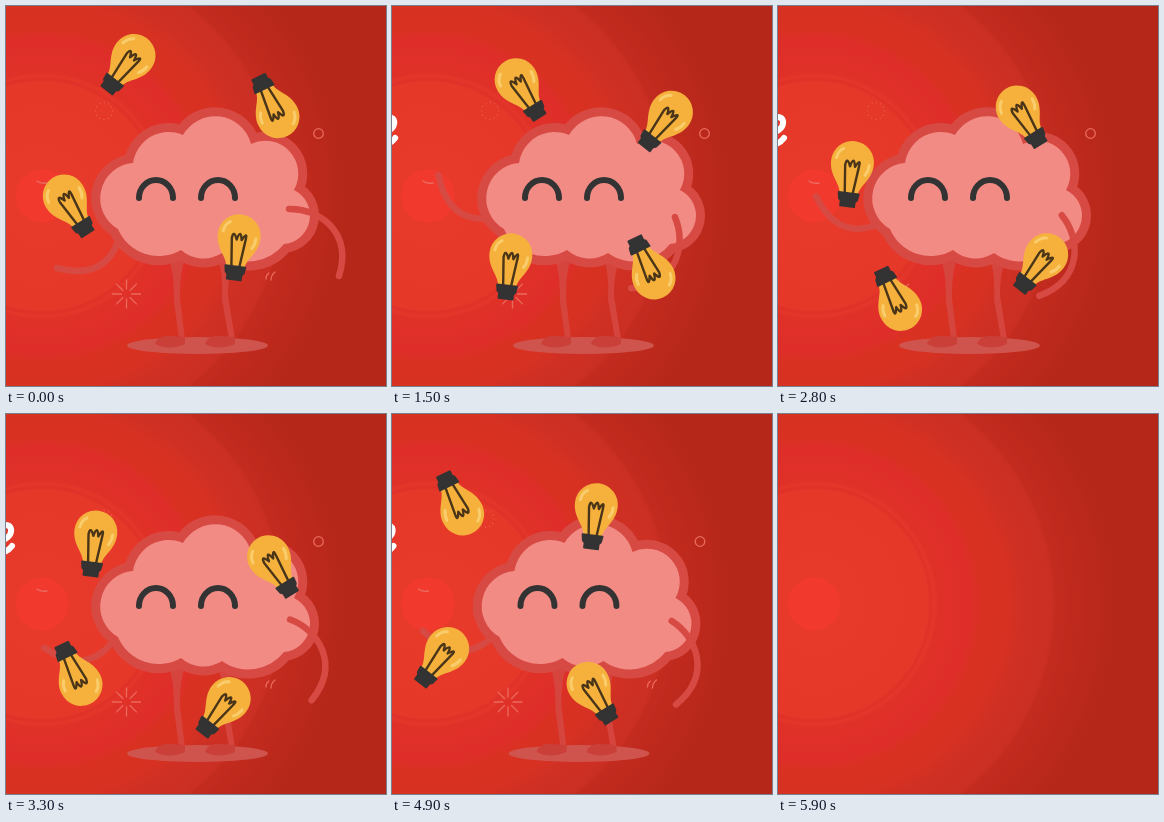
Recreate the animation shown at these times as an HTML page. Size 380x380 px, loop 6100 ms.

```html
<!DOCTYPE html>
<html lang="en">
<head>
<meta charset="utf-8">
<title>Juggling brain</title>
<style>
  html, body { margin: 0; width: 100%; height: 100%; overflow: hidden; background: #b52719; }
  svg { display: block; width: 100vw; height: 100vh; }
  .line { fill: none; stroke-linecap: round; stroke-linejoin: round; }
  .limb { stroke: #d74a43; stroke-width: 6.5; }
  .decor { stroke: #ea6a5e; stroke-width: 1.3; }
</style>
</head>
<body>
<svg viewBox="0 0 380 380">
  <defs>
    <radialGradient id="glow" gradientUnits="userSpaceOnUse" cx="36" cy="190" r="400">
      <stop offset=".065" stop-color="#f13a2d"/>
      <stop offset=".067" stop-color="#e83a2a"/>
      <stop offset=".285" stop-color="#e53829"/>
      <stop offset=".292" stop-color="#df3128"/>
      <stop offset=".3" stop-color="#e4372a"/>
      <stop offset=".31" stop-color="#e03128"/>
      <stop offset=".39" stop-color="#df2e2a"/>
      <stop offset=".42" stop-color="#d93122"/>
      <stop offset=".49" stop-color="#d63122"/>
      <stop offset=".52" stop-color="#cf3023"/>
      <stop offset=".595" stop-color="#cb2f23"/>
      <stop offset=".605" stop-color="#c32b1f"/>
      <stop offset=".73" stop-color="#b8281a"/>
      <stop offset=".76" stop-color="#b42719"/>
    </radialGradient>
    <g id="bulb">
      <path fill="#f5b13c" d="M-9 21C-9 10-21.500 4-21.500-12A21.500 21.500 0 0 1 21.500-12C21.500 4 9 10 9 21Z"/>
      <path class="line" stroke="#f9cc6c" stroke-width="3" d="M-16.500-15q1-7 6-10M17-11q0 6-3 10"/>
      <path class="line" stroke="#4a3518" stroke-width="2.400" d="M-4 19L-7-9Q-6-18-2-8Q1-20 3-8Q8-18 7-9L4 19"/>
      <path fill="#333" stroke="#333" stroke-width="2" stroke-linejoin="round" d="M-10 19H10L9 25L7 27V32H-7V27L-9 25Z"/>
    </g>
  </defs>

  <rect width="380" height="380" fill="url(#glow)"/>

  <g id="scene">
    <g class="line decor">
      <circle cx="312.500" cy="127.500" r="4.800"/>
      <circle cx="98" cy="105" r="8.500" stroke-dasharray=".1 4.350" opacity=".7"/>
      <path d="M31 175q3 3 10 2M260 273q0-4 3-6M265 274q0-5 4-8"/>
      <g id="burst"></g>
    </g>

    <ellipse cx="191.500" cy="339.500" rx="70.500" ry="8.500" fill="#d0544e"/>
    <g fill="#d5443d">
      <path d="M163 255H179Q174 264 174 292L179 333H173L168 296Q168 264 163 255Z"/>
      <path d="M212 255H228Q222 264 222 290L229 333H223L216 294Q217 264 212 255Z"/>
      <path fill="#cb3f39" d="M149 338Q152 329 163 330L179 331V338Q163 345 149 338ZM199 338Q202 329 213 330L229 331V338Q213 345 199 338Z"/>
    </g>

    <path id="leftArm" class="line limb" d="M116 222C108 260 85 271 51 262"/>
    <path fill="#f38b85" stroke="#d74a43" stroke-width="18" stroke-linejoin="round" paint-order="stroke"
      d="M127 157A36 36 0 0 1 177 129A37 37 0 0 1 245 138A33 33 0 0 1 288 184A28.500 28.500 0 0 1 278 238A45 45 0 0 1 216 247A34 34 0 0 1 175 244A44 44 0 0 1 112 223A35.400 35.400 0 0 1 127 157Z"/>
    <path class="line" stroke="#333" stroke-width="6" d="M133 192A17 18 0 0 1 167 192M195 192A17 18 0 0 1 229 192"/>
    <path id="rightArm" class="line limb" d="M283 203C312 202 347 225 333 270"/>
    <g id="bulbs"></g>
  </g>

  <path id="word" class="line" stroke="#fff" stroke-width="6" d="M-14 128C0 128 6 121 5 115C3 107-14 111-14 128C-14 143 0 140 6 132"/>
</svg>

<script>
const LOOP = 6100, STEP = 100, LAST = 5900;
const SWING = 4000, ORBIT_SPEED = 0.0527;
const SLIDE = 460, SLIDE_TIME = 1500, ENTER = 400;
const get = id => document.getElementById(id);

// cx, cy: orbit centre; start: degrees clockwise from the top
const bulbs = [
  { cx: 162, cy: 179, r: 127, start: -19, tilt: 38 },
  { cx: 164, cy: 174.5, r: 127, start: 54, tilt: 154 },
  { cx: 168, cy: 182, r: 105, start: 260, tilt: -32 },
  { cx: 163, cy: 182, r: 91, start: 131, tilt: 7 },
];

get('bulbs').innerHTML = '<use href="#bulb"/>'.repeat(bulbs.length);
get('burst').innerHTML = Array.from({ length: 8 }, (_, i) =>
  `<path d="M0-5V-14" transform="translate(120.500 288) rotate(${i * 45})"/>`).join('');

const place = (el, transform) => el.setAttribute('transform', transform);
const expo = ms => SLIDE * 2 ** (10 * ms / SLIDE_TIME);

function draw(t) {
  const exit = expo(t - LAST);
  place(get('scene'), `translate(${-exit})`);
  place(get('word'), `translate(${-exit - expo(ENTER - t)})`);

  const swing = (1 - Math.cos(2 * Math.PI * t / SWING)) / 2;
  place(get('leftArm'), `rotate(${75 * swing} 123 212)`);
  place(get('rightArm'), `rotate(${80 * swing} 277 207)`);

  bulbs.forEach(({ cx, cy, r, start, tilt }, i) => {
    const a = (start + ORBIT_SPEED * t) * Math.PI / 180;
    const x = cx + r * Math.sin(a), y = cy - r * Math.cos(a);
    place(get('bulbs').children[i], `translate(${x} ${y}) rotate(${tilt})`);
  });
}

const origin = performance.now();
function tick() {
  const t = (performance.now() - origin) % LOOP;
  draw(Math.min(LAST, Math.floor(t / STEP) * STEP));
  requestAnimationFrame(tick);
}
tick();
</script>
</body>
</html>
```
